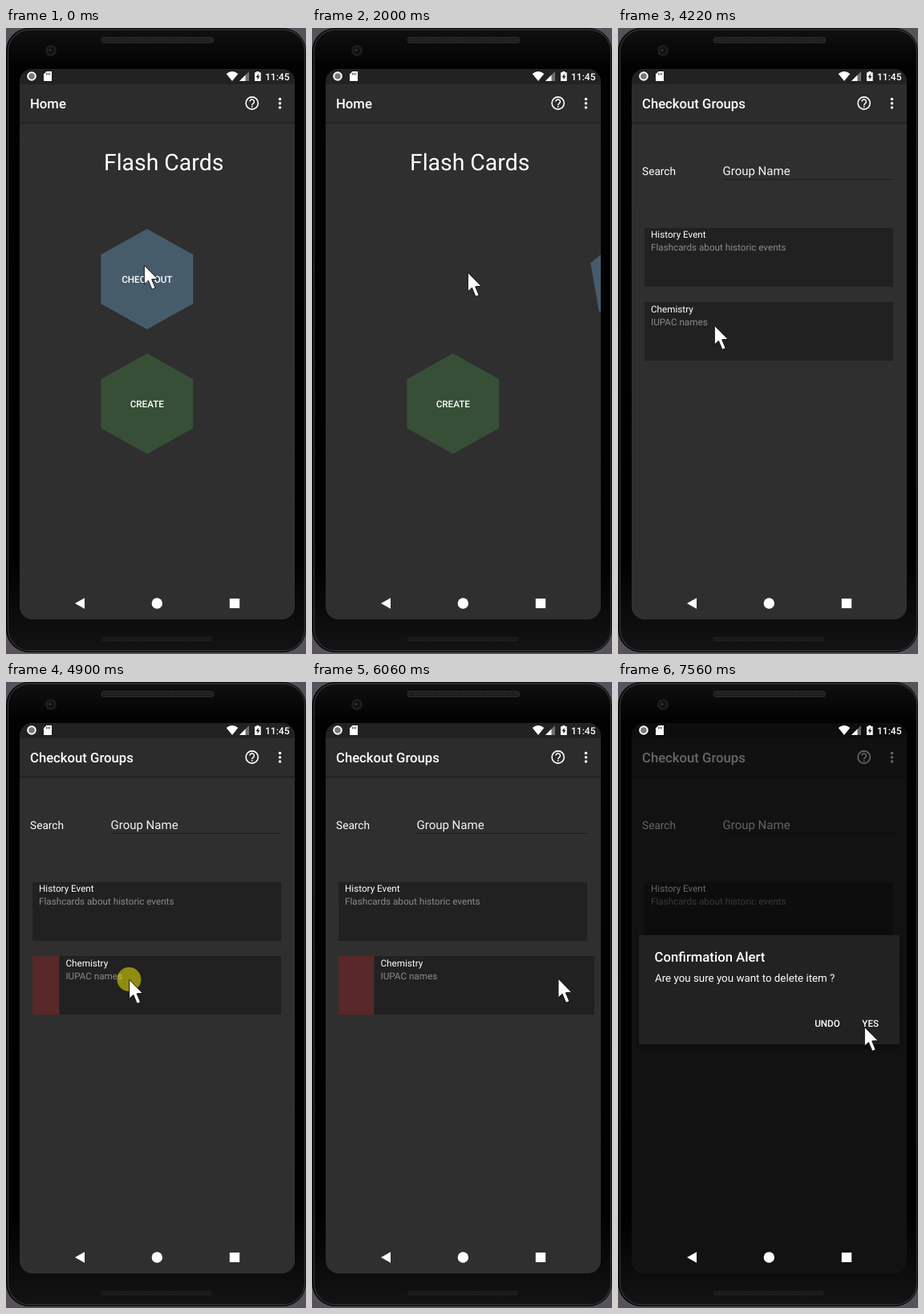
An HTML page for the animation above (8000 ms loop, 374 px wide and 779 px high).

```html
<!DOCTYPE html>
<html lang="en">
<head>
<meta charset="utf-8">
<title>Flash Cards</title>
<style>
html, body { margin: 0; width: 100%; height: 100%; overflow: hidden; background: #000; }
svg { display: block; width: 100vw; height: 100vh; }
text { font-family: Roboto, Arial, sans-serif; fill: #fff; text-rendering: geometricPrecision; }
.bold { font-weight: 500; }
.title { font-size: 16.7px; font-weight: 500; }
.button { font-size: 11.7px; font-weight: 500; text-anchor: middle; }
.item { font-size: 11.7px; }
.note { font-size: 11.7px; fill: #8b8b8b; }
</style>
</head>
<body>
<svg viewBox="0 0 374 779" xmlns="http://www.w3.org/2000/svg">
  <defs>
    <clipPath id="screen"><rect x="17" y="51" width="343" height="685" rx="16"/></clipPath>
    <linearGradient id="body" x2="0" y2="1">
      <stop offset="0" stop-color="#101010"/>
      <stop offset=".06" stop-color="#020202"/>
      <stop offset=".85" stop-color="#000"/>
      <stop offset="1" stop-color="#131313"/>
    </linearGradient>
    <linearGradient id="shade" x2="0" y2="1">
      <stop offset="0" stop-color="#000" stop-opacity=".28"/>
      <stop offset="1" stop-color="#000" stop-opacity="0"/>
    </linearGradient>
    <pattern id="mesh" width="3" height="3" patternUnits="userSpaceOnUse">
      <rect width="3" height="3" fill="#252525"/><circle cx="1.5" cy="1.5" r=".8" fill="#0c0c0c"/>
    </pattern>
    <filter id="blur" x="-10%" y="-20%" width="120%" height="140%"><feGaussianBlur stdDeviation="4"/></filter>
    <path id="hex" d="M0-62.5 57.5-30.5V30.5L0 62.5-57.5 30.5V-30.5Z"/>
  </defs>

  <!-- phone -->
  <rect width="374" height="779" fill="#56515a"/>
  <rect x="0" y="0" width="374" height="777" rx="29" fill="#050505"/>
  <rect x="2.5" y="2" width="370" height="773" rx="27" fill="url(#body)" stroke="#343434" stroke-width="1.3"/>
  <rect x="119" y="11.500" width="140" height="7" rx="3" fill="url(#mesh)" stroke="#2d2d2d" stroke-width=".8"/>
  <rect x="119" y="757.500" width="138" height="6" rx="3" fill="url(#mesh)" opacity=".65"/>
  <circle cx="56" cy="28" r="7" fill="#1d1d1f"/>
  <circle cx="56" cy="28" r="4" fill="#101014"/>
  <circle cx="55" cy="27.500" r="1.5" fill="#37373d"/>

  <g clip-path="url(#screen)">
    <rect x="17" y="51" width="343" height="685" fill="#2f2f2f"/>

    <g id="home">
      <text x="122" y="177" font-size="28.4">Flash Cards</text>
      <g transform="translate(175.8 467.500)">
        <use href="#hex" fill="#374f37"/>
        <text class="button" y="4.500">CREATE</text>
      </g>
      <g id="roller">
        <use href="#hex" fill="#465c6b"/>
        <text class="button" y="4.500">CHECK OUT</text>
      </g>
    </g>

    <g id="groups">
      <text x="30" y="182.500" font-size="13.7">Search</text>
      <text x="130.500" y="182.500" font-size="15" fill-opacity=".94">Group Name</text>
      <path d="M131 188.500H343" stroke="#1b1b1b"/>
      <rect x="33" y="249" width="310" height="73" fill="#212121"/>
      <text class="item" x="41" y="261">History Event</text>
      <text class="note" x="41" y="277">Flashcards about historic events</text>
      <rect id="red" x="33" y="341" width="0" height="73" fill="#592828"/>
      <rect id="card" x="33" y="341" width="310" height="73" fill="#212121"/>
      <g id="label">
        <text class="item" x="41" y="354">Chemistry</text>
        <text class="note" x="41" y="369.500">IUPAC names</text>
      </g>
    </g>

    <rect x="17" y="70" width="343" height="48" fill="#2c2c2c"/>
    <rect x="17" y="117" width="343" height="4" fill="url(#shade)"/>
    <rect x="17" y="51" width="343" height="19" fill="#222"/>
    <text id="title" class="title" x="30" y="100">Home</text>
    <circle cx="306.700" cy="93.500" r="7.600" fill="none" stroke="#fff" stroke-width="1.6"/>
    <path d="M304 91.600a2.700 2.700 0 1 1 4.500 2q-1.800 1.300-1.800 2.600" fill="none" stroke="#fff" stroke-width="1.5"/>
    <rect x="305.900" y="97.200" width="1.600" height="1.600" fill="#fff"/>
    <g fill="#fff">
      <circle cx="341.500" cy="88.400" r="1.750"/><circle cx="341.500" cy="93.700" r="1.750"/><circle cx="341.500" cy="99" r="1.750"/>
    </g>

    <rect id="dim" x="17" y="51" width="343" height="685" fill="#000"/>

    <!-- status and navigation icons -->
    <g fill="#fff">
      <circle cx="32" cy="60" r="4.800" fill="#777" stroke="#fff" stroke-width="2"/>
      <path d="M50.500 54H57V66H47V57.500Z"/>
      <path d="M50.500 56v2.500m2-2.500v2.500m2-2.500v2.500" stroke="#333" stroke-width=".9"/>
      <path d="M274.700 57Q282 51 289.300 57L282 66Z"/>
      <path d="M291 66 303 54V66Z" opacity=".35"/>
      <path d="M291 66 298.500 58.500V66Z"/>
      <path d="M310 55.200H312.200V54H315.300V55.200H317.700V66H310Z"/>
      <path d="M314.700 56.800 311.600 61.200H313.500V64.600L316.300 60H314.700Z" fill="#222"/>
      <text class="bold" x="353.500" y="64.700" font-size="12" text-anchor="end">11:45</text>
      <path d="M86 716 98 709.200V722.800Z"/>
      <circle cx="188.300" cy="716" r="6.700"/>
      <rect x="278.800" y="710" width="12.400" height="12"/>
    </g>

    <g id="dialog">
      <rect x="26" y="319" width="325" height="136" fill="#000" opacity=".5" filter="url(#blur)"/>
      <rect x="26" y="315" width="325" height="136" rx="1.500" fill="#222"/>
      <text class="title" x="45.500" y="348">Confirmation Alert</text>
      <text x="46" y="373.300" font-size="13.340">Are you sure you want to delete item ?</text>
      <text class="button" x="261" y="429.300">UNDO</text>
      <text class="button" x="314.700" y="429.300">YES</text>
    </g>
  </g>

  <g id="pointer">
    <circle id="press" r="15" fill="#fff700" fill-opacity=".5"/>
    <path d="M.3.300V24L5.400 19.300 10 30.300 14.200 28.500 9.700 17.800 17 17.300Z" fill="#fff" stroke="#111" stroke-width="1"/>
  </g>
</svg>
<script>
const LOOP = 8000;
const el = id => document.getElementById(id);
const set = (id, name, value) => el(id).setAttribute(name, value);
const show = (id, on) => set(id, 'visibility', on ? 'visible' : 'hidden');
const part = (t, from, to) => Math.min(1, Math.max(0, (t - from) / (to - from)));
const sine = p => (1 - Math.cos(Math.PI * p)) / 2;
const slowDown = p => 1 - (1 - p) ** 3;

// pointer tip: time, x, y
const path = [
  [0, 172, 295], [420, 172, 295], [720, 194, 304], [2430, 194, 304],
  [2820, 253, 309], [2960, 272, 317], [3230, 187, 350], [3430, 179, 361],
  [3580, 179, 361], [3590, 179, 362], [3950, 179, 362], [4220, 120, 370],
  [4640, 120, 370], [5000, 161, 370], [5140, 161, 370], [5150, 161, 371],
  [5350, 161, 371], [5520, 259, 367], [5800, 318, 367], [6150, 300, 370],
  [6210, 296, 373], [6540, 213, 451], [6670, 195, 463], [6920, 195, 463],
  [7560, 307, 429], [LOOP, 307, 429]
];

const same = (a, b) => a[1] === b[1] && a[2] === b[2];

// tangent at a key; zero next to a pause
function slope(i, axis) {
  const a = path[i - 1], b = path[i], c = path[i + 1];
  if (!a || !c || same(a, b) || same(b, c)) return 0;
  return (c[axis] - a[axis]) / (c[0] - a[0]);
}

function tip(t) {
  let i = 0;
  while (i < path.length - 2 && t >= path[i + 1][0]) i++;
  const a = path[i], b = path[i + 1], d = b[0] - a[0], u = (t - a[0]) / d;
  const ease = u * u * (3 - 2 * u);
  return [1, 2].map(k => a[k] + (b[k] - a[k]) * ease
    + d * u * (1 - u) * ((1 - u) * slope(i, k) - u * slope(i + 1, k)));
}

function draw(t) {
  const [x, y] = tip(t);
  set('pointer', 'transform', `translate(${x} ${y})`);
  show('press', (t >= 1240 && t < 1320) || (t >= 4500 && t < 6060));

  const roll = sine(part(t, 1465, 2065));
  set('roller', 'transform', `translate(${175.8 + 240 * roll} 312.500) rotate(${360 * roll})`);
  const swap = part(t, 2030, 2230);
  set('home', 'opacity', 1 - swap);
  set('groups', 'opacity', swap);
  el('title').textContent = t < 2030 ? 'Home' : 'Checkout Groups';

  // the card follows the drag up to its stop
  const held = t >= 4640;
  const shift = held ? Math.min(44.5, Math.max(0, t < 5800 ? x - 120 : 44.5)) : 0;
  const right = t < 5360 ? 343 : 352;
  set('red', 'width', shift);
  set('card', 'x', 33 + shift);
  set('card', 'width', right - 33 - shift);
  set('label', 'transform', `translate(${shift} 0)`);

  const open = slowDown(part(t, 6190, 6420));
  set('dim', 'opacity', 0.6 * open);
  set('dialog', 'opacity', open);
  const scale = 0.9 + 0.1 * open;
  set('dialog', 'transform', `translate(188.500 383) scale(${scale}) translate(-188.500 -383)`);
}

const start = performance.now();
function tick() {
  draw((performance.now() - start) % LOOP);
  requestAnimationFrame(tick);
}
tick();
</script>
</body>
</html>
```
